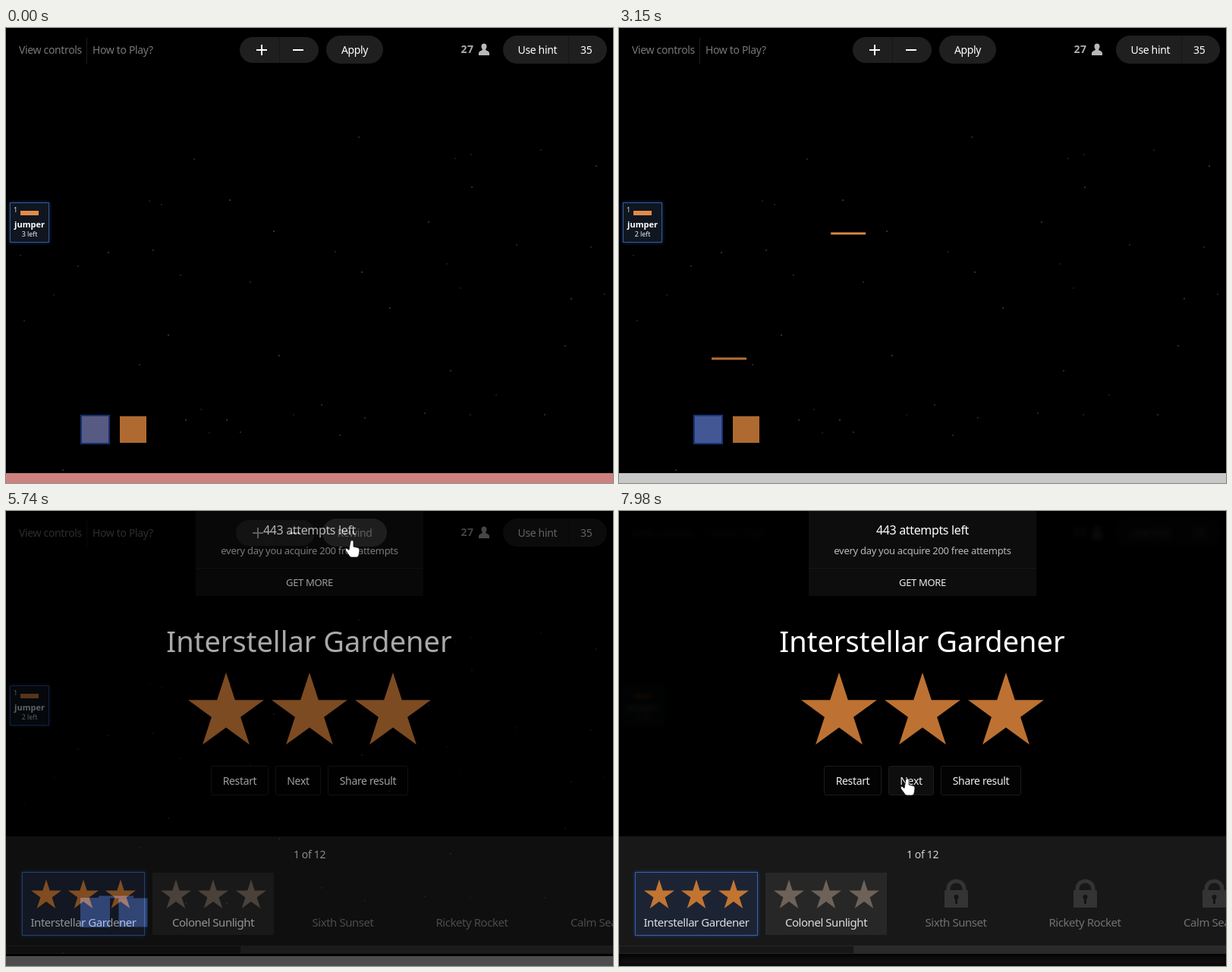
Animation of 800 by 600 pixels, one loop 8 s. Source, as an HTML page:

```html
<!DOCTYPE html>
<html lang="en">
<head>
<meta charset="utf-8">
<title>Jumper puzzle</title>
<style>
  html, body { margin: 0; width: 100%; height: 100%; overflow: hidden; background: #000; }
  svg { display: block; width: 800px; height: 600px; }
  text { font: 14px "Noto Sans", "DejaVu Sans", sans-serif; letter-spacing: -.35px; }
  .mid { text-anchor: middle; }
</style>
</head>
<body>
<svg id="stage" viewBox="0 0 800 600"></svg>
<script>
const LOOP = 8000;
const stage = document.getElementById('stage');

// Markup helpers
const rect = (x, y, w, h, fill, extra = '') =>
  `<rect x="${x}" y="${y}" width="${w}" height="${h}" fill="${fill}" ${extra}/>`;
const text = (str, x, y, fill, style = '', extra = '') =>
  `<text x="${x}" y="${y}" fill="${fill}" style="${style}" ${extra}>${str}</text>`;
const centered = (str, x, y, fill, style = '', id = '') =>
  text(str, x, y, fill, style, `class="mid" ${id && `id="${id}"`}`);
const star = (cx, cy, r, fill) => {
  const points = Array.from({ length: 10 }, (_, i) => {
    const angle = i * Math.PI / 5, radius = i % 2 ? r * .382 : r;
    return [cx + radius * Math.sin(angle), cy - radius * Math.cos(angle)].map(v => v.toFixed(1));
  });
  return `<polygon points="${points.join(' ')}" fill="${fill}"/>`;
};
const lock = x => `<g transform="translate(${x} 0)">
  <path d="M-10.5 502v-4a10.5 10 0 0 1 21 0v4" fill="none" stroke="#343434" stroke-width="5"/>
  ${rect(-15.5, 500, 31, 23, '#343434', 'rx="1"')}
  <circle cy="509" r="3" fill="#141414"/>${rect(-1.5, 510, 3, 8, '#141414')}</g>`;
const button = (label, x, w, id = '') =>
  rect(x + .5, 336.5, w - 1, 38, '#030303', `stroke="#1b1b1b" rx="2" ${id && `id="${id}"`}`) +
  centered(label, x + w / 2, 361, '#f0f0f0');

// Night sky, brightest first
const sky = [
  295,227, 469,322, 360,432, 353,268, 291,517, 237,517, 214,405, 506,369, 778,182, 135,296,
  745,357, 614,210, 194,293, 75,583, 557,256, 586,452, 710,510, 737,419, 465,144, 416,497,
  440,537, 552,508, 473,514, 309,533, 176,444, 95,314, 230,326, 248,173, 322,335, 673,286,
  771,289, 434,295, 205,233, 789,351, 705,161, 612,510, 19,300, 63,352, 24,386, 189,228,
  592,172, 613,167, 599,343, 581,311, 646,484, 268,534, 379,510, 257,503
];
let dots = '';
for (let i = 0; i < sky.length; i += 2) {
  const shade = Math.round(64 - i * .4);
  dots += `<circle cx="${sky[i]}" cy="${sky[i + 1]}" r="1.1" fill="rgb(${shade},${shade},${shade})"/>`;
}

const game = `<g id="game">
  ${dots}
  ${text('View controls', 17, 34, '#777')}
  ${rect(106, 13, 1, 34, '#1c1c1c')}
  ${text('How to Play?', 114, 34, '#777')}
  <g id="zoom">
    ${rect(308, 12, 104, 34, '#1f1f1f', 'rx="17"')}${rect(360, 12, 1, 34, '#171717')}
    <path d="M330 29h14M337 22v14M378 29h14" stroke="#fff" stroke-width="2"/>
  </g>
  ${rect(422, 10, 75, 37, '#1f1f1f', 'rx="18.5" id="pill"')}
  ${centered('Apply', 459.5, 34, '#fff', '', 'action')}
  ${text('27', 599.5, 33, '#aaa', 'font-weight:700;letter-spacing:.6px')}
  <path d="M623 36v-3q0-2 4-3.500l1-1q-2-3-1.500-5 .5-3 3.500-3t3.500 3q.5 2-1.500 5l1 1q4 1.500 4 3.500v3z" fill="#b8b8b8"/>
  ${rect(655, 10, 137, 37, '#1f1f1f', 'rx="18.5"')}${rect(741, 10, 1, 37, '#171717')}
  ${text('Use hint', 674.5, 34, '#fff')}
  ${text('35', 757, 34, '#fff')}
  ${rect(5.5, 230.5, 51, 52, '#0f1620', 'stroke="#34589c" style="filter:drop-shadow(0 0 2px #1c3972)"')}
  ${text('1', 10, 243, '#ddd', 'font-size:9px')}
  ${rect(19, 241, 24, 6, '#e48a47')}
  ${centered('jumper', 31, 263, '#fff', 'font-size:11px;font-weight:700;letter-spacing:0')}
  ${centered('3 left', 31, 275, '#eee', 'font-size:9px;letter-spacing:-.1px', 'count')}
  ${rect(0, 587, 800, 13, '#c8c8c8', 'id="floor"')}
  ${rect(99, 511, 37, 37, '#555a88', 'id="source" stroke-width="2"')}
  ${rect(150, 512, 35, 35, '#af6a31', 'id="target"')}
  ${rect(122, 0, 46, 3, '#b66f34', 'id="placed"')}
  ${rect(0, 0, 46, 3, '#de8b46', 'id="ghost" stroke="#5c3517" stroke-width=".6"')}
</g>`;

const overlay = `<g id="overlay">
  ${rect(0, 0, 800, 600, '#000', 'opacity=".93"')}
  ${rect(250, 0, 300, 112, '#0d0d0d')}${rect(250, 75, 300, 1, '#181818')}
  ${centered('443 attempts left', 400, 31, '#fff', 'font-size:16px')}
  ${centered('every day you acquire 200 free attempts', 400, 57, '#b8b8b8', 'font-size:13px;letter-spacing:-.29px')}
  ${centered('GET MORE', 400, 99, '#eee', 'font-size:13px')}
  ${centered('Interstellar Gardener', 399.5, 186, '#fff', 'font-size:38px;letter-spacing:0')}
  ${[290, 400, 510].map(x => star(x, 265.5, 52.5, '#bd7233')).join('')}
  ${button('Restart', 270, 76)}${button('Next', 355, 60, 'next')}${button('Share result', 424, 106)}
  ${rect(0, 429, 800, 144, '#181818')}
  ${centered('1 of 12', 400, 458, '#d0d0d0')}
  ${rect(21.5, 476.5, 161, 83, '#1c2434', 'stroke="#3c60ac" style="filter:drop-shadow(0 0 2px #203f7c)"')}
  ${rect(193, 477, 160, 82, '#272727')}
  ${[53, 102, 151].map(x => star(x, 507, 21, '#c27432')).join('')}
  ${[224, 273, 323].map(x => star(x, 507, 21, '#6e6258')).join('')}
  <g style="--label:15px">
    ${[['Interstellar Gardener', 102, '#ddd'], ['Colonel Sunlight', 273, '#ddd'],
       ['Sixth Sunset', 444, '#707070'], ['Rickety Rocket', 614, '#707070']]
      .map(([name, x, fill]) => centered(name, x, 548, fill, 'font-size:15px;letter-spacing:-.45px')).join('')}
    ${text('Calm Season', 744, 548, '#707070', 'font-size:15px;letter-spacing:-.45px')}
  </g>
  <g id="locks">${[444.5, 614.5, 784.5].map(lock).join('')}</g>
  ${rect(0, 573, 800, 11, '#2a2a2a')}
  ${rect(.5, 573.5, 309, 10, '#171717', 'stroke="#262626"')}
</g>`;

const cursor = `<g id="cursor" fill="#fff" stroke="#111" stroke-width=".8">
  <path id="arrow" d="M0 0v16l3.700-3.500 2.800 6.300 2.700-1.200-2.800-6h5z"/>
  <path id="hand" d="M-2 1q2-3 4 0v7l5.500 1.300q2.700.7 2.500 3.700l-1 6q-.5 3-3 3h-6.500q-2 0-3-2l-5-7q-1-3 1.500-3l3 2.500z"/>
</g>`;

stage.innerHTML = game + overlay + cursor;
const $ = Object.fromEntries([...stage.querySelectorAll('[id]')].map(el => [el.id, el]));
const set = (el, attrs) => { for (const key in attrs) el.setAttribute(key, attrs[key]); };
const show = (el, visible) => { el.style.display = visible ? '' : 'none'; };

// Motion helpers
const ramp = (t, from, to) => Math.min(1, Math.max(0, (t - from) / (to - from)));
const mix = (a, b, k) => a + (b - a) * k;
const blend = (a, b, k) => `rgb(${a.map((v, i) => Math.round(mix(v, b[i], k)))})`;
const along = (path, t) => {
  let i = 1;
  while (i < path.length - 1 && t > path[i][0]) i++;
  const [t0, x0, y0] = path[i - 1], [t1, x1, y1] = path[i];
  const k = ramp(t, t0, t1);
  return [mix(x0, x1, k), mix(y0, y1, k)];
};

const PLACED = 1960, PICKED = 2310, APPLIED = 4650, LANDED = 4880;
const ghostPath = [
  [700, 266, 435], [910, 231, 434], [1470, 128, 435.5], [1820, 122, 436], [2420, 122, 436],
  [3150, 279, 271], [3220, 286, 262], [4060, 416, 78], [4160, 423, 67]
];
const cursorPath = [
  [4200, 446, 64], [4480, 456, 39], [5900, 456, 39], [6650, 388, 214],
  [6930, 377, 323], [7280, 380, 353]
];

function draw(t) {
  const applied = t >= APPLIED, solved = t >= LANDED;

  $.floor.setAttribute('fill', blend([207, 128, 128], [200, 200, 200], ramp(t, 0, 350)));
  $.count.textContent = t < PICKED ? '3 left' : '2 left';

  const pulse = (1 + Math.cos((t - 600) / 1500 * 2 * Math.PI)) / 2;
  const lit = '#5a88f5';
  set($.source, {
    fill: solved ? lit : blend([95, 91, 123], [16, 79, 197], pulse),
    stroke: solved ? lit : blend([22, 46, 104], [28, 66, 158], pulse)
  });
  set($.target, { fill: solved ? lit : '#af6a31', stroke: solved ? lit : 'none', 'stroke-width': 3 });

  const [gx, gy] = along(ghostPath, t);
  show($.ghost, t >= 700 && !applied && (t < PLACED || t >= PICKED));
  set($.ghost, { x: gx, y: gy - 1.5 });

  const fall = ramp(t, APPLIED, LANDED) ** 2;
  show($.placed, t >= PLACED);
  set($.placed, { y: mix(434.5, 507.5, fall), fill: solved ? lit : '#b66f34' });

  const [cx, cy] = along(cursorPath, t);
  const overApply = cy < 47, overNext = t > 6900 && cy >= 337;
  show($.cursor, t >= 4200);
  show($.hand, overApply || overNext);
  show($.arrow, !overApply && !overNext);
  $.cursor.setAttribute('transform', `translate(${cx} ${cy})`);

  $.action.textContent = applied ? 'Rewind' : 'Apply';
  set($.pill, {
    x: applied ? 417 : 422, width: applied ? 85 : 75,
    fill: t >= 4200 && overApply ? '#404040' : '#1f1f1f'
  });
  $.zoom.setAttribute('transform', `translate(${applied ? -5 : 0} 0)`);
  $.next.setAttribute('fill', overNext ? '#0e0e0e' : '#030303');

  const fade = ramp(t, 4900, 6170);
  show($.overlay, fade > 0);
  $.overlay.setAttribute('opacity', fade);
  $.locks.setAttribute('opacity', ramp(t, 5760, 6250));
  const blur = 3 * ramp(t, 5760, 6300);
  $.game.style.filter = blur ? `blur(${blur}px)` : 'none';
}

const start = performance.now();
function tick() {
  draw((performance.now() - start) % LOOP);
  requestAnimationFrame(tick);
}
tick();
</script>
</body>
</html>
```
